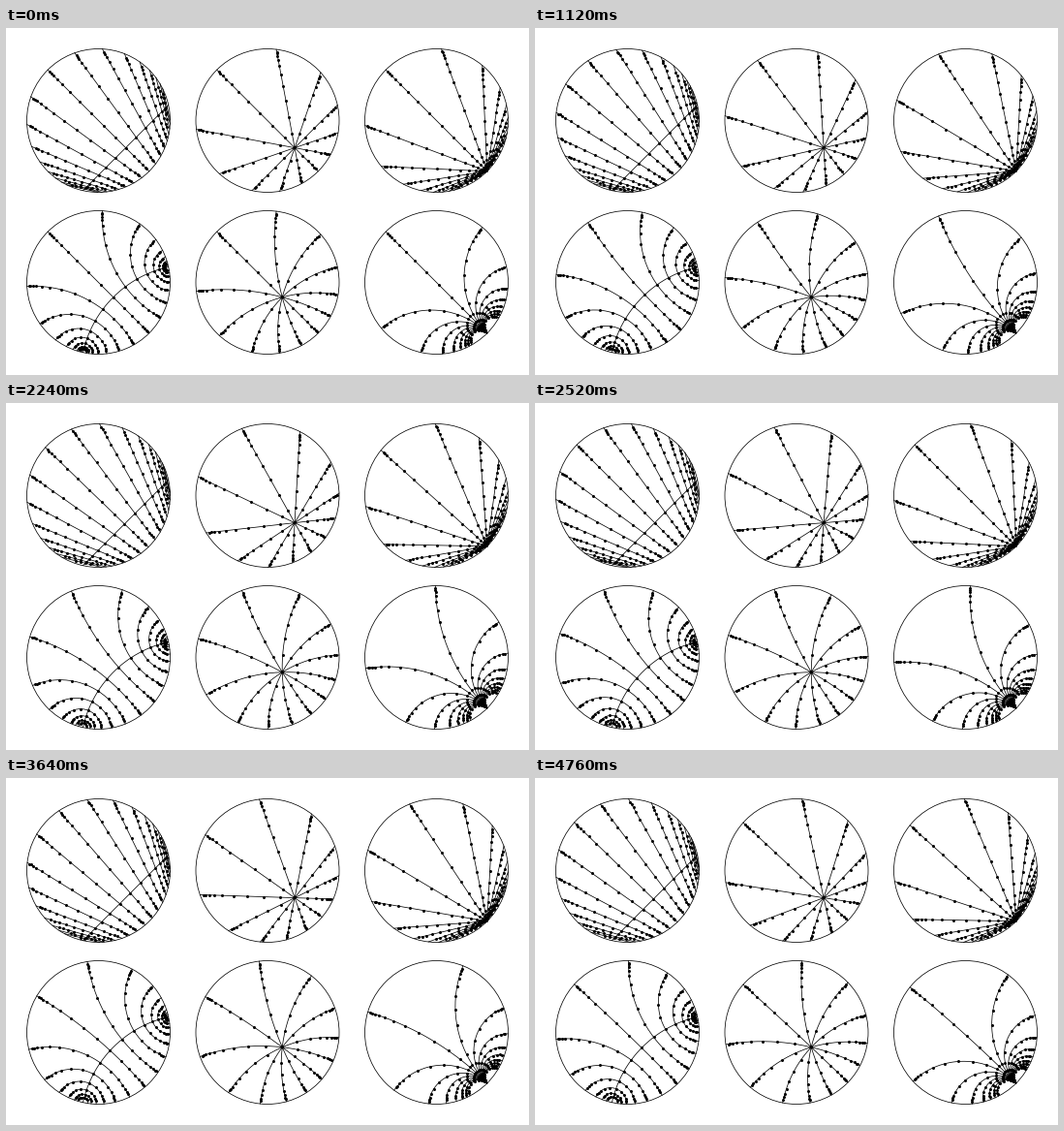
These frames come from a looping animation (540 by 358 pixels, 5040 ms). A matplotlib script:

```python
import numpy as np
import matplotlib.pyplot as plt
from matplotlib.animation import FuncAnimation
from matplotlib.patches import Circle

WIDTH, HEIGHT, DPI = 540, 358, 100
FRAMES, INTERVAL = 18, 280
RADIUS = 74
SHIFT = 0.6     # hyperbolic distance from disc centre to the pencil's base
DOT_LIMIT = 0.97  # dots closer to the rim than this are left out
PX = 72 / DPI
STROKE = dict(color="black", lw=0.75 * PX)


def boost(t, u, v):
    """Translate hyperboloid points by SHIFT along the diagonal."""
    c, s = np.cosh(SHIFT), np.sinh(SHIFT)
    return c * t + s * u, s * t + c * u, v


def perpendicular(tau, rho):
    """Point at height rho on the line crossing the axis at tau."""
    return boost(np.cosh(rho) * np.cosh(tau), -np.sinh(rho),
                 np.cosh(rho) * np.sinh(tau))


def ray(theta, rho):
    """Point at distance rho from the pencil's centre."""
    return boost(np.cosh(rho), -np.sinh(rho) * np.cos(theta),
                 np.sinh(rho) * np.sin(theta))


def parallel(x, h):
    """Half-plane point (x, exp(h)); the ideal point is at infinity."""
    y = np.exp(h)
    q = x * x + y * y
    return boost((q + 1) / (2 * y), (q - 1) / (2 * y), x / y)


def klein(t, u, v):
    return u / t, v / t


def poincare(t, u, v):
    return u / (1 + t), v / (1 + t)


class Panel:
    def __init__(self, ax, centre, model, family, lines, travel, span, dots):
        self.centre, self.model, self.family = centre, model, family
        self.lines, self.travel = lines, travel
        self.step = lines[1] - lines[0]
        self.span, self.dots = span, dots
        ax.add_patch(Circle(centre, RADIUS, fill=False, ec="black",
                            lw=0.75 * PX))
        self.curves, = ax.plot([], [], **STROKE)
        self.marks, = ax.plot([], [], "o", color="black", ms=3 * PX, mew=0)
        if family is perpendicular:
            axis = self.project(np.linspace(-8, 8, 200), 0.0)
            ax.plot(*self.to_pixels(*axis), **STROKE)

    def project(self, line, pos):
        return self.model(*self.family(line, pos))

    def to_pixels(self, u, v):
        k = RADIUS / np.sqrt(2)
        return self.centre[0] + k * (u + v), self.centre[1] + k * (u - v)

    def update(self, phase):
        lines = self.lines + (phase * self.travel) % self.step
        x, y = self.to_pixels(*self.project(lines[:, None], self.span))
        gap = np.full((len(lines), 1), np.nan)
        self.curves.set_data(np.hstack([x, gap]).ravel(),
                             np.hstack([y, gap]).ravel())
        u, v = self.project(lines[:, None], self.dots)
        inside = np.hypot(u, v) < DOT_LIMIT
        self.marks.set_data(*self.to_pixels(u[inside], v[inside]))
        return [self.curves, self.marks]


fig = plt.figure(figsize=(WIDTH / DPI, HEIGHT / DPI), dpi=DPI, facecolor="white")
ax = fig.add_axes([0, 0, 1, 1])
ax.set_xlim(0, WIDTH)
ax.set_ylim(HEIGHT, 0)
ax.axis("off")

full = np.linspace(-8, 8, 161)
half = np.linspace(0, 8, 81)
angles = np.radians(30) * np.arange(12)
both_ways = np.arange(-20, 21)
outward = np.arange(1, 21)

panels = []
for model, cy, step, reach in ((klein, 95.5, 0.25, 8), (poincare, 262.5, 0.5, 7)):
    feet = step * np.arange(-reach, reach + 1)
    verticals = step * np.arange(-8, 9)
    panels += [
        Panel(ax, (95.5, cy), model, perpendicular, feet, 0.5,
              full, step * both_ways),
        Panel(ax, (270, cy), model, ray, angles, np.radians(30),
              half, step * outward),
        Panel(ax, (444.5, cy), model, parallel, verticals, 0.5,
              full, step * both_ways),
    ]


def draw(frame):
    return [artist for p in panels for artist in p.update(frame / FRAMES)]


anim = FuncAnimation(fig, draw, frames=FRAMES, interval=INTERVAL,
                     repeat=True, repeat_delay=0, blit=False)
plt.show()
```
